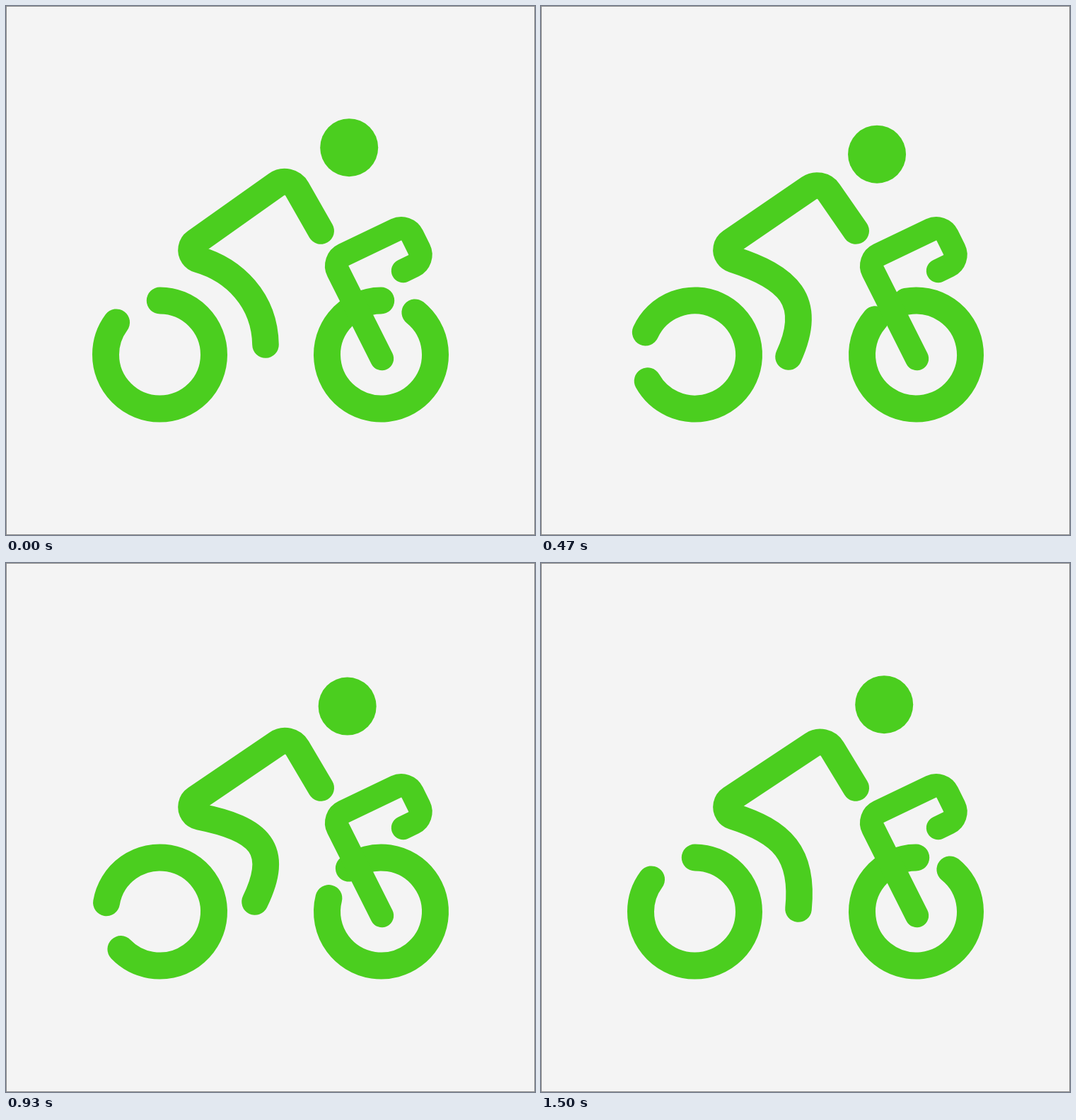
An HTML page with a canvas that plays this animation: 748 px wide and 748 px high, repeating every 1560 ms.

```html
<!DOCTYPE html>
<html lang="en">
<head>
<meta charset="utf-8">
<title>Cyclist</title>
<style>
  html, body { margin: 0; width: 100%; height: 100%; overflow: hidden; background: #f4f4f4; }
  canvas { display: block; }
</style>
</head>
<body>
<canvas id="stage" width="748" height="748"></canvas>
<script>
const ctx = document.getElementById('stage').getContext('2d');
const SIZE = 748, LOOP = 1560, LAST = 45;
const GREEN = '#4bce1f', PAPER = '#f4f4f4', EDGE = '#8c8c8c';
const HIP = { x: 276, y: 345, r: 14 };
const HAND = [445.2, 318];

// Rider poses: step, then shoulder, two leg handles and foot as x, y pairs.
const POSES = [
  [0, 400.5, 239.6, 322, 373, 366, 415, 367, 479],
  [5, 400.5, 239.6, 345, 378, 374, 415, 364, 482],
  [14, 395.5, 246.3, 348, 383, 387, 416, 350, 496],
  [22, 398.3, 242.6, 361, 370, 408, 395, 340, 477],
  [28, 401, 243.2, 360, 376, 388, 405, 352, 479],
  [33, 401, 245.3, 340, 380, 372, 410, 364, 489]
];

const clamp = v => Math.min(1, Math.max(0, v));
const rad = deg => deg * Math.PI / 180;
const smooth = v => (v = clamp(v), v * v * (3 - 2 * v));

// Cubic easing with flat ends: x handles a and b, y handles 0 and 1.
function ease(x, a, b) {
  let lo = 0, hi = 1;
  for (let i = 0; i < 24; i++) {
    const s = (lo + hi) / 2, q = 1 - s;
    if (3 * a * s * q * q + 3 * b * s * s * q + s * s * s < x) lo = s;
    else hi = s;
  }
  return smooth(lo);
}

// Smooth curve through the poses, at rest at both ends.
function poseAt(step) {
  const end = POSES.length - 1;
  if (step >= POSES[end][0]) return POSES[end].slice(1);
  let i = 0;
  while (step >= POSES[i + 1][0]) i++;
  const p = POSES[i], n = POSES[i + 1], span = n[0] - p[0];
  const u = (step - p[0]) / span, w = 1 - u;
  const slope = (k, c) => k === 0 || k === end ? 0 :
    (POSES[k + 1][c] - POSES[k - 1][c]) / (POSES[k + 1][0] - POSES[k - 1][0]);
  return p.map((v, c) =>
    v * w * w * (1 + 2 * u) + n[c] * u * u * (3 - 2 * u) +
    span * u * w * (w * slope(i, c) - u * slope(i + 1, c))).slice(1);
}

function stroke(width, trace) {
  ctx.lineWidth = width;
  ctx.beginPath();
  trace();
  ctx.stroke();
}

function wheel(x, gapStart, gap, turn) {
  stroke(38, () => ctx.arc(x, 493, 76.5,
    rad(gapStart + gap + turn), rad(gapStart + turn + 360)));
}

function bike() {
  stroke(33.4, () => {
    ctx.moveTo(531.5, 498.5);
    ctx.arcTo(461.6, 359.4, 566.9, 309.1, 17.2);
    ctx.arcTo(566.9, 309.1, 591.8, 359.6, 17.2);
    ctx.arcTo(591.8, 359.6, 561.5, 374.5, 17.2);
    ctx.lineTo(561.5, 374.5);
  });
}

// Angle on the hip circle where the tangent from a point touches it.
function touch(x, y, side) {
  const dx = x - HIP.x, dy = y - HIP.y;
  return Math.atan2(dy, dx) + side * Math.acos(HIP.r / Math.hypot(dx, dy));
}

function rider(step) {
  const [sx, sy, ax, ay, bx, by, fx, fy] = poseAt(step);
  const back = touch(sx, sy, -1), thigh = touch(ax, ay, 1);
  stroke(37.6, () => {
    ctx.moveTo(...HAND);
    ctx.arcTo(sx, sy, HIP.x + HIP.r * Math.cos(back), HIP.y + HIP.r * Math.sin(back), 20);
    ctx.arc(HIP.x, HIP.y, HIP.r, back, thigh, true);
    ctx.bezierCurveTo(ax, ay, bx, by, fx, fy);
  });
}

function head(step) {
  const nod = smooth(step / 15.4) - smooth((step - 15.4) / 18.6);
  ctx.beginPath();
  ctx.arc(485.2 - 10.4 * nod, 200.2 + 9.7 * nod, 41, 0, 2 * Math.PI);
  ctx.fill();
}

function draw(step) {
  ctx.fillStyle = PAPER;
  ctx.fillRect(0, 0, SIZE, SIZE);
  ctx.lineCap = 'butt';
  ctx.strokeStyle = EDGE;
  ctx.lineWidth = 1;
  ctx.strokeRect(0.5, 0.5, SIZE - 1, SIZE - 1);

  ctx.lineCap = 'round';
  ctx.strokeStyle = ctx.fillStyle = GREEN;
  const spin = clamp((step - 1.5) / 43.5);
  wheel(217.5, 216.6, 53.6, 720 * ease(spin, 0.333, 0.2));
  wheel(530.5, 269.8, 39, 720 * ease(spin, 0.333, 0.173));
  bike();
  rider(step);
  head(step);
}

const start = performance.now();
function tick(now) {
  const t = Math.max(0, now - start) % LOOP;
  // 30 steps a second, on a 10 ms clock; the last one is held.
  draw(Math.min(LAST, Math.floor((Math.floor(t / 10) + 0.5) * 0.3)));
  requestAnimationFrame(tick);
}
tick(start);
</script>
</body>
</html>
```
